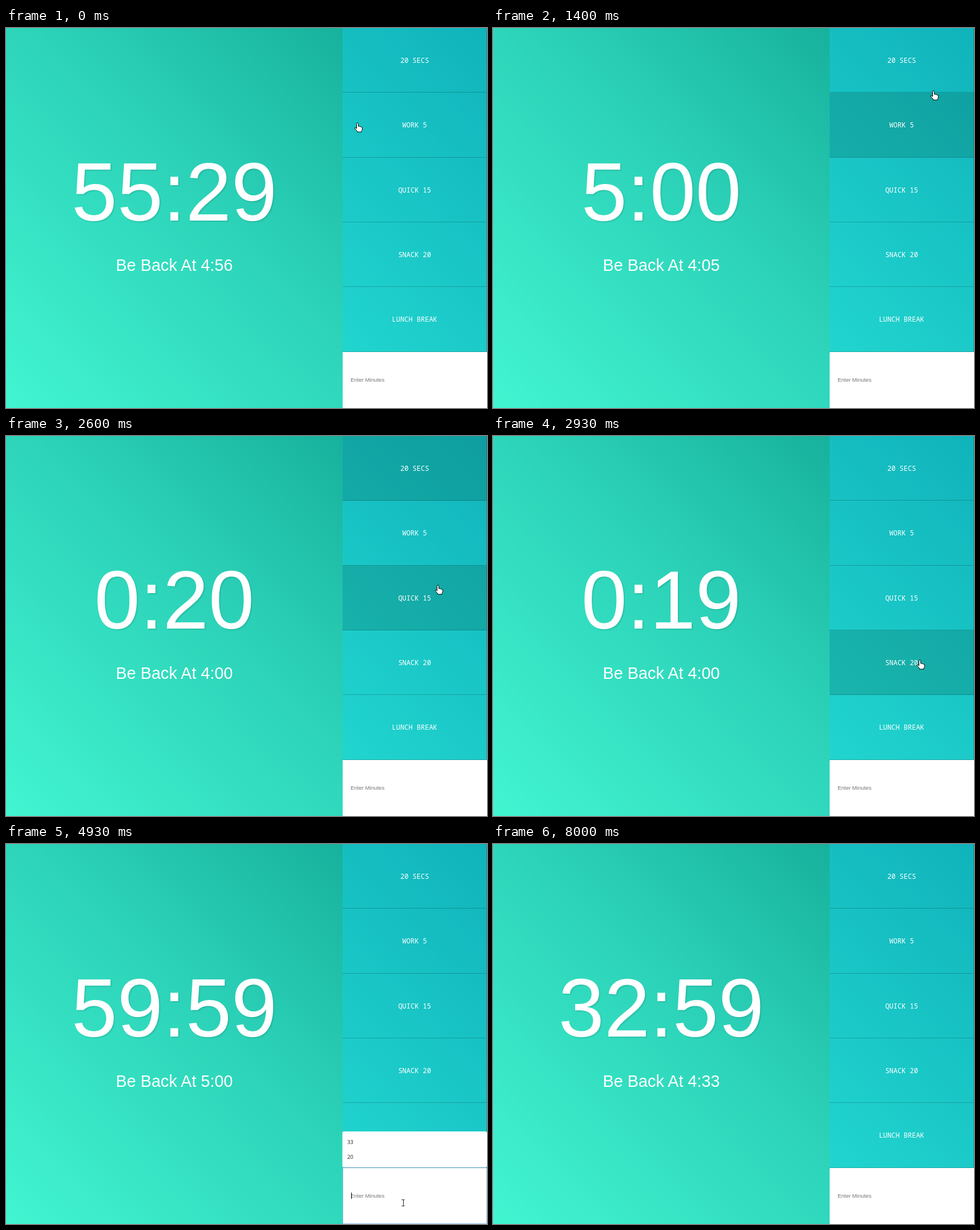
An HTML page for the animation above (8140 ms loop, 843 by 665 pixels).

```html
<!DOCTYPE html>
<html lang="en">
<head>
<meta charset="utf-8">
<title>Countdown timer</title>
<style>
  html, body { margin: 0; width: 100%; height: 100%; overflow: hidden; }
  svg { display: block; width: 843px; height: 665px; font-family: "Liberation Sans", Arial, sans-serif; }
  .light { fill: #fff; text-anchor: middle; }
  #time { font-size: 144px; text-shadow: 2px 2px 2px rgba(0, 0, 0, .1); }
  #back { font-size: 28.8px; }
  #buttons text { font: 12px "Noto Sans Mono", monospace; }
  #field { font-size: 9.6px; }
  #list text { font: 9.4px "Open Sans", sans-serif; fill: #222; }
</style>
</head>
<body>
<svg viewBox="0 0 843 665">
  <defs>
    <linearGradient id="green" gradientUnits="userSpaceOnUse" x1="0" y1="665" x2="754" y2="-89">
      <stop stop-color="#42f5d1"/>
      <stop offset=".5" stop-color="#2bd1b7"/>
      <stop offset="1" stop-color="#0da18f"/>
    </linearGradient>
    <linearGradient id="blue" gradientUnits="userSpaceOnUse" x1="590" y1="567" x2="1000" y2="157">
      <stop stop-color="#21d5cf"/>
      <stop offset="1" stop-color="#10b3bb"/>
    </linearGradient>
  </defs>
  <rect width="590" height="665" fill="url(#green)"/>
  <text id="time" class="light" x="295" y="337"></text>
  <text id="back" class="light" x="295" y="425"></text>
  <rect x="590" width="253" height="567" fill="url(#blue)"/>
  <g id="buttons"></g>
  <rect x="590" y="567" width="253" height="98" fill="#fff"/>
  <text id="field" x="604" y="619"></text>
  <rect id="outline" x="590.5" y="566.5" width="252" height="98" fill="none" stroke="#8cbcf5"/>
  <g id="list">
    <rect id="panel" x="589.5" width="253.5" rx="3" fill="#fff"/>
    <path d="M590 566.5H843" stroke="#3a8fb9"/>
    <text id="first" x="598">33</text>
    <text id="second" x="598" y="551">20</text>
  </g>
  <rect id="caret" y="610" width="1" height="11"/>
  <path id="hand" fill="#fff" stroke="#000" stroke-linejoin="round"
    d="M-1.5 10V1.5a1.5 1.5 0 0 1 3 0V6q2-.8 2.7.7 2-.6 2.4.8 2-.3 2 1.5c0 3-.8 4-1.6 5.5V16H-.5v-1.5L-4.7 10q-.6-2 1.2-1.7z"/>
  <path id="beam" fill="none" stroke="#222" d="M-2.5-5.5H-1L0-5 1-5.5H2.5M.5-5V5M-2.5 5.5H-1L0 5 1 5.5H2.5"/>
</svg>
<script>
const LOOP = 8140, FPS = 15, ROW = 113.3;
const $ = id => document.getElementById(id);
const show = (id, on) => $(id).style.display = on ? '' : 'none';
const within = (t, a, b) => t >= a && t < b;
const last = (list, t) => list.filter(e => e[0] <= t).pop();

const labels = ['20 SECS', 'WORK 5', 'QUICK 15', 'SNACK 20', 'LUNCH BREAK'];
$('buttons').innerHTML = labels.map((label, i) => {
  const y = i * ROW, edge = Math.round(y + ROW) - .5;
  return `<rect class="shade" x="590" y="${y}" width="253" height="${ROW}" fill="rgba(6,69,50,.2)"/>
    <path d="M590 ${edge}H842.5V${Math.round(y)}" fill="none" stroke="rgba(0,0,0,.2)"/>
    <text class="light" x="716.2" y="${y + 61}">${label}</text>`;
}).join('');
const shades = document.querySelectorAll('.shade');

// start, seconds on the clock, return time
const timers = [
  [0, 3329, '4:56'], [533, 300, '4:05'], [1933, 20, '4:00'],
  [3000, 1200, '4:20'], [3933, 3600, '5:00'], [6133, 1980, '4:33']
];
// start, focused button
const focus = [[0, -1], [467, 1], [1800, 0], [2933, 3], [3867, 4], [4867, -1]];
// time, x, y of the pointer
const track = [
  [0, 616, 166], [67, 622, 167], [333, 660, 171], [867, 660, 171],
  [1133, 715, 351], [1333, 762, 160], [1400, 772, 110], [1667, 770, 88],
  [2133, 770, 88], [2200, 768, 103], [2933, 748, 392], [3000, 747, 392],
  [3667, 727, 512], [4200, 727, 512], [4867, 697, 624], [4933, 696, 628],
  [6600, 696, 628], [6667, 695, 628], [7267, 676, 643], [LOOP, 676, 643]
];

function pointer(t) {
  const i = track.findIndex(p => p[0] > t);
  const [a, b] = [track[i - 1], track[i]];
  const k = (t - a[0]) / (b[0] - a[0]);
  return [1, 2].map(n => Math.round(a[n] + (b[n] - a[n]) * k));
}

function draw(t) {
  const [start, total, back] = last(timers, t);
  const left = total - Math.floor((t - start) / 1000);
  $('time').textContent = Math.floor(left / 60) + ':' + String(left % 60).padStart(2, '0');
  $('back').textContent = 'Be Back At ' + back;

  // hover trails the pointer by one step
  const hover = t ? Math.floor(pointer(Math.max(0, t - 67))[1] / ROW) : -1;
  const focused = last(focus, t)[1];
  shades.forEach((s, i) => s.style.display = i === hover || i === focused ? '' : 'none');

  const typed = within(t, 5467, 5600) ? '3' : within(t, 5600, 6133) ? '33' : '';
  $('field').textContent = typed || 'Enter Minutes';
  $('field').setAttribute('fill', typed ? '#000' : '#757575');
  show('outline', within(t, 4867, 8000));
  show('caret', typed || within(t, 4867, 5267) || within(t, 6133, 6667) || within(t, 7200, 7733));
  $('caret').setAttribute('x', 605 + Math.round(typed.length * 5.34));

  const both = t < 5533, top = both ? 503 : 528;
  show('list', within(t, 4867, 5667));
  show('second', both);
  $('panel').setAttribute('y', top);
  $('panel').setAttribute('height', 566 - top);
  $('first').setAttribute('y', both ? 525 : 551);

  const [x, y] = pointer(t), inField = y > 567;
  show('hand', !inField);
  show('beam', inField && t < 8000);
  $(inField ? 'beam' : 'hand').setAttribute('transform', `translate(${x} ${y})`);
}

function frame() {
  const step = Math.min(121, Math.floor((performance.now() % LOOP + 4) * FPS / 1000));
  draw(Math.round(step * 1000 / FPS));
  requestAnimationFrame(frame);
}
frame();
</script>
</body>
</html>
```
